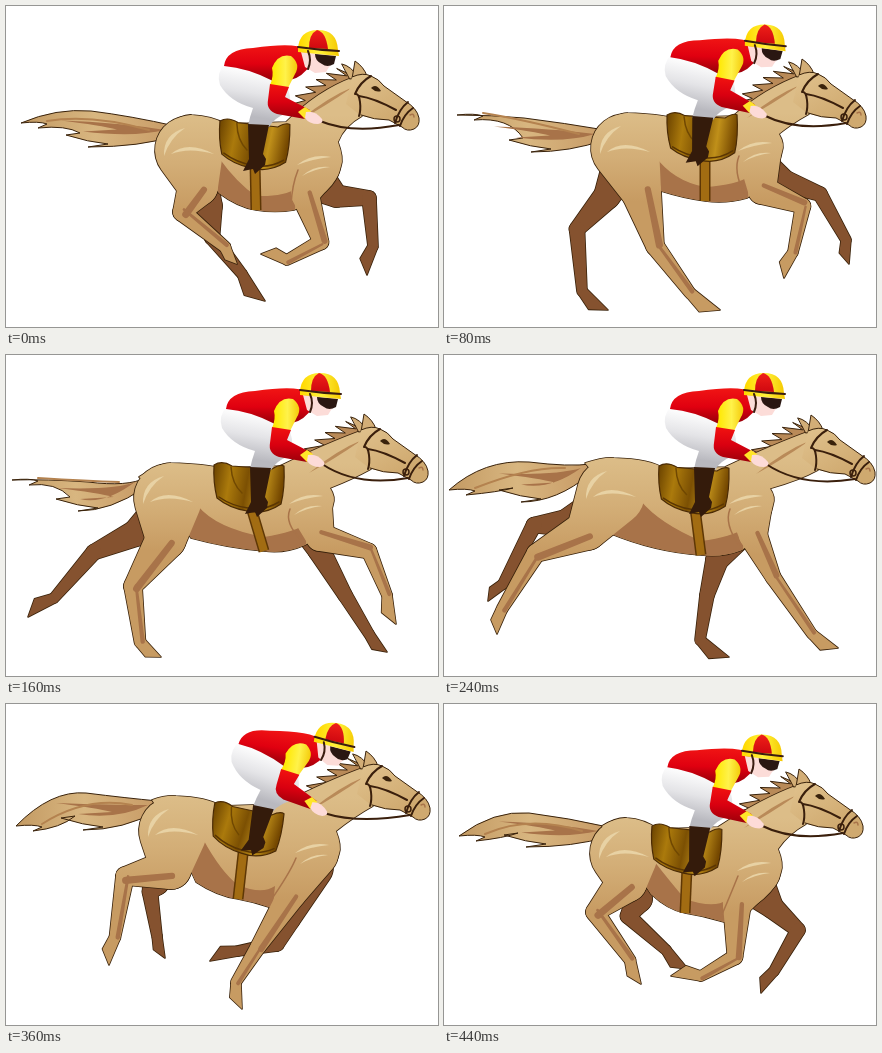
Animation of 432x321 px, one loop 0.48 s. Source, as an HTML page with a canvas:

```html
<!DOCTYPE html>
<html lang="en">
<head>
<meta charset="utf-8">
<title>Galloping horse</title>
<style>
  html, body { margin: 0; width: 100%; height: 100%; overflow: hidden; background: #fff; }
  canvas { display: block; width: 432px; height: 321px; }
</style>
</head>
<body>
<canvas id="stage" width="432" height="321"></canvas>
<script>
const ctx = document.getElementById('stage').getContext('2d');
const STEP = 40, STEPS = 12;
const KEYS = [0, 2, 4, 6, 7, 9, 11];
const INK = '#39220b', TAN = '#d3ae77', LIGHT = '#e8d2a4', SHADE = '#a87349', FAR = '#85522f', STRAP = '#3a1f0c';

// Key poses, one row per entry of KEYS. Legs: upper joint, middle joint, fetlock, toe.
const nearHind = [
  [192,180, 176,206, 219,241, 231,258],
  [197,185, 211,240, 246,287, 276,304],
  [160,184, 127,231, 134,287, 155,302],
  [143,175, 92,198, 58,254, 53,279],
  [150,172, 97,185, 59,233, 44,257],
  [165,165, 119,172, 109,233, 103,261],
  [183,178, 151,208, 186,256, 197,280]];
const farHind = [
  [203,200, 206,231, 236,268, 259,295],
  [163,190, 133,223, 138,285, 164,304],
  [130,178, 88,197, 48,243, 22,262],
  [122,168, 90,170, 59,229, 44,246],
  [128,165, 102,165, 86,228, 79,249],
  [150,178, 144,188, 151,232, 159,254],
  [195,195, 184,212, 222,246, 244,265]];
const nearFore = [
  [299,188, 315,236, 281,254, 255,248],
  [318,184, 359,200, 349,246, 340,272],
  [314,182, 363,196, 381,240, 390,269],
  [309,180, 329,222, 368,279, 394,293],
  [307,180, 310,235, 313,287, 338,303],
  [286,190, 252,243, 230,278, 236,305],
  [293,200, 291,253, 257,272, 227,272]];
const farFore = [
  [330,190, 363,192, 367,240, 361,269],
  [340,175, 376,188, 402,234, 405,258],
  [313,195, 339,240, 363,279, 381,297],
  [273,205, 263,240, 256,285, 285,302],
  [262,208, 237,245, 212,279, 195,303],
  [283,215, 271,240, 232,247, 204,257],
  [328,203, 354,226, 330,267, 317,289]];
// Croup, flank, girth, elbow, chest, poll.
const trunk = [
  [186,109, 213,187, 250,204, 288,204, 335,160, 352,68],
  [184,107, 217,185, 261,195, 303,192, 338,146, 361,66],
  [165,108, 185,183, 258,196, 299,190, 327,150, 361,72],
  [170,103, 165,178, 257,200, 298,195, 329,150, 370,73],
  [170,98, 172,176, 243,199, 295,203, 328,150, 370,72],
  [170,92, 190,178, 232,195, 266,204, 333,150, 363,60],
  [183,114, 207,190, 241,209, 280,218, 337,168, 358,78]];
// Root, tip, upper bend, lower bend.
const tailKeys = [
  [163,119, 15,117, 85,98, 90,141],
  [155,123, 13,109, 80,105, 95,146],
  [133,122, 6,125, 82,120, 80,156],
  [141,108, 5,135, 85,100, 85,147],
  [147,102, 3,130, 85,92, 85,140],
  [146,96, 10,122, 80,82, 85,126],
  [158,122, 15,132, 85,102, 90,143]];
// x, y, tilt in degrees.
const saddleKeys = [[214,114,2], [223,108,-1], [208,109,0], [215,110,1], [208,105,5], [209,98,8], [208,121,2]];
const riderKeys = [[213,70,0], [221,61,2], [215,64,0], [221,64,0], [229,58,4], [226,49,9], [218,73,2]];

// Periodic cubic through the key poses.
function sample(rows, t) {
  const n = KEYS.length;
  let i = n - 1;
  while (KEYS[i] > t) i--;
  const row = k => rows[(k + n) % n];
  const time = k => KEYS[(k + n) % n] + STEPS * Math.floor(k / n);
  const h = time(i + 1) - time(i), u = (t - time(i)) / h;
  return rows[0].map((_, c) => {
    const a = row(i)[c], b = row(i + 1)[c];
    const va = (b - row(i - 1)[c]) / (time(i + 1) - time(i - 1)) * h;
    const vb = (row(i + 2)[c] - a) / (time(i + 2) - time(i)) * h;
    return a + u * (va + u * (3 * (b - a) - 2 * va - vb + u * (2 * (a - b) + va + vb)));
  });
}
const points = (rows, t) => {
  const v = sample(rows, t);
  return v.filter((_, i) => i % 2 === 0).map((x, i) => [x, v[2 * i + 1]]);
};
const add = ([x, y], dx, dy) => [x + dx, y + dy];

function paint(path, fill, line, width = 1) {
  const p = typeof path === 'string' ? new Path2D(path) : path;
  if (fill) { ctx.fillStyle = fill; ctx.fill(p); }
  if (line) { ctx.strokeStyle = line; ctx.lineWidth = width; ctx.stroke(p); }
}
function ramp(x0, y0, x1, y1, ...colors) {
  const g = ctx.createLinearGradient(x0, y0, x1, y1);
  colors.forEach((c, i) => g.addColorStop(i / (colors.length - 1), c));
  return g;
}
function placed([x, y, tilt], ox, oy, draw) {
  ctx.save();
  ctx.translate(x, y);
  ctx.rotate(tilt * Math.PI / 180);
  ctx.translate(-ox, -oy);
  draw();
  ctx.restore();
}

// Tapered link between two round joints.
function link([x0, y0], r0, [x1, y1], r1) {
  const p = new Path2D(), d = Math.hypot(x1 - x0, y1 - y0), a = Math.atan2(y1 - y0, x1 - x0);
  if (d <= Math.abs(r0 - r1)) {
    p.arc(x0, y0, r0, 0, 7);
  } else {
    const o = Math.acos((r0 - r1) / d);
    p.arc(x0, y0, r0, a + o, a - o + 2 * Math.PI);
    p.arc(x1, y1, r1, a - o, a + o);
    p.closePath();
  }
  return p;
}
function hoof([fx, fy], [tx, ty], r) {
  const dx = tx - fx, dy = ty - fy, d = Math.hypot(dx, dy) || 1;
  const nx = -dy / d * r, ny = dx / d * r;
  return new Path2D(`M${fx - nx} ${fy - ny}L${tx} ${ty}L${fx + .5 * dx - .34 * dy} ${fy + .5 * dy + .34 * dx}L${fx + nx} ${fy + ny}Z`);
}
function limb(root, leg, radii) {
  const joints = [root, ...leg.slice(0, 3)];
  const parts = radii.slice(1).map((r, i) => link(joints[i], radii[i], joints[i + 1], r));
  return [...parts, hoof(leg[2], leg[3], radii[3])];
}
const edge = parts => parts.forEach(p => paint(p, INK, INK, 1.6));
const fill = (parts, color) => parts.forEach(p => paint(p, color));

function legShade(leg, radii) {
  for (let i = 0; i < 2; i++) {
    const [a, b] = [leg[i], leg[i + 1]], d = Math.hypot(b[0] - a[0], b[1] - a[1]) || 1;
    const nx = (b[1] - a[1]) / d, ny = (a[0] - b[0]) / d;
    const off = k => k * .5;
    const ra = radii[i + 1] * .7, rb = radii[i + 2];
    paint(link(add(a, nx * off(ra), ny * off(ra)), ra * .22, add(b, nx * off(rb), ny * off(rb)), rb * .4), SHADE);
  }
}

function drawTail([root, tip, up, low]) {
  const [rx, ry] = root, [tx, ty] = tip, [ux, uy] = up, [lx, ly] = low;
  paint(`M${rx + 6} ${ry + 1}Q${ux + 40} ${uy + 12} ${ux} ${uy + 7}Q${tx + 35} ${uy + 4} ${tx} ${ty}
    Q${tx + 18} ${ty - 2} ${tx + 26} ${ty + 1}L${tx + 17} ${ty + 5}Q${lx - 30} ${ty + 2} ${lx - 16} ${ly - 14}L${lx - 30} ${ly - 12}
    Q${lx - 8} ${ly - 5} ${lx + 12} ${ly - 3}L${lx - 8} ${ly}Q${rx - 28} ${ly} ${rx + 5} ${ry + 11}Z`,
    ramp(tx, 0, rx, 0, '#c39a63', '#d8b680', '#c99d68'), INK);
  const my = (uy + ly) / 2;
  paint(`M${rx - 4} ${ry + 5}Q${ux + 28} ${my - 3} ${ux - 30} ${my - 5}Q${ux + 10} ${my} ${ux + 26} ${my + 4}L${ux - 8} ${my + 6}
    Q${rx - 35} ${my + 12} ${rx - 4} ${ry + 5}Z`, SHADE);
  paint(`M${rx - 20} ${ry + 5}Q${ux} ${my - 12} ${tx + 26} ${ty - 2}`, null, '#b4824f', 2);
}

function drawHead([px, py]) {
  ctx.save();
  ctx.translate(px, py);
  paint('M-16 -10Q-7 -8 0 3L-8 5Z', TAN, INK);
  paint('M-6 5L-3 -13Q6 -7 9 2Z', TAN, INK);
  paint('M-6 3Q5 -2 13 2Q21 5 26 12L47 27Q59 34 61 44Q62 52 56 55Q49 58 44 53Q37 49 31 46Q16 46 2 41L-12 30Z',
    ramp(0, 0, 30, 50, '#dfc08b', '#cfa96f'));
  paint('M-6 3Q5 -2 13 2Q21 5 26 12L47 27Q59 34 61 44Q62 52 56 55Q49 58 44 53Q37 49 31 46Q16 46 3 41', null, INK);
  paint('M13 14Q18 9 23 17Q18 19 13 14Z', INK);
  paint('M52 41Q56 39 56 43', null, SHADE, 1.5);
  paint('M13 2Q2 8 -3 20Q1 19 2 28Q3 36 1 42M1 22Q16 24 38 36M50 28Q41 35 37 49M55 34Q46 40 42 52', null, STRAP, 2);
  paint('M36 45a3 3 0 1 0 6 0a3 3 0 1 0 -6 0', null, STRAP, 1.5);
  ctx.restore();
}

function drawMane([px, py]) {
  const bx = px - 62, by = py + 37;
  let d = `M${px - 4} ${py + 2}`;
  for (let i = 1; i <= 6; i++) {
    const u = i / 6, x = px - 4 + (bx - px) * u, y = py + 2 + (by - py) * u * u * .65 + (by - py) * u * .35;
    d += `L${x - 7} ${y - 11 + 4 * u}L${x + 3} ${y - 3}`;
  }
  paint(d + `L${bx + 3} ${by + 4}Q${px - 28} ${py + 14} ${px} ${py + 14}Z`, '#b98a58', INK);
}

function drawSaddle() {
  paint('M0 1Q8 -4 18 2L58 5Q66 0 70 2Q71 24 67 40Q51 51 33 47Q15 44 3 34Q-1 18 0 1Z',
    ramp(0, 0, 70, 12, '#6b4300', '#ab7a0c', '#7c5003', '#c0901a', '#744700'), '#4b2b05', 1.2);
  paint('M5 33Q18 42 34 44Q50 47 65 38', null, '#5b3603', 1.5);
  paint('M17 3Q18 20 28 29', null, '#704802', 1.5);
}

function drawRider() {
  paint('M219 57Q210 67 214 79Q224 96 247 102Q244 110 242 120L263 121Q268 112 281 107Q287 98 282 82L266 66Z',
    ramp(240, 62, 232, 108, '#ffffff', '#e4e4e7', '#b9b9bf'));
  paint('M242 118L263 119L257 148L260 153L259 159L249 168L247 163L237 165L243 153Z', '#341b0b');
  paint('M218 60Q220 43 247 42Q288 36 300 43L305 58Q296 72 284 74L267 75Q242 62 218 60Z',
    ramp(0, 40, 0, 76, '#f01414', '#e00010', '#8e0008'));
  paint('M266 62Q272 47 285 50Q295 58 289 68L282 82L264 79Q268 70 266 62Z', ramp(266, 0, 293, 0, '#ffe800', '#fff24a', '#f2c400'));
  paint('M264 78L283 81L279 91L304 104L299 113L271 108Q260 104 262 94Z', ramp(0, 80, 0, 112, '#ef1010', '#d90010', '#a0000a'));
  paint('M292 106L299 101L305 105L299 113Z', '#ffe528');
  paint('M300 106Q309 104 316 113Q318 117 312 118Q303 118 299 112Z', '#fddbd8');
  paint('M295 46L328 48L327 57Q322 61 320 66L309 67L299 61Z', '#fcdcd8');
  paint('M309 48L330 50L328 58Q321 62 316 58Q309 55 309 48Z', '#2a1712');
  paint('M292 43Q293 24 312 24Q331 24 332 44L333 50L322 49L292 46Z', ramp(293, 0, 333, 0, '#ffd800', '#fff23a', '#f5c800'));
  paint('M303 42Q303 28 311 24Q320 26 322 43Z', ramp(0, 24, 0, 43, '#f02018', '#cf0810'));
  paint('M292 41Q312 44 333 45M302 45Q306 54 302 63', null, '#3a1c10', 2);
}

function draw(t) {
  ctx.clearRect(0, 0, 432, 321);
  ctx.fillStyle = '#fff';
  ctx.fillRect(0, 0, 432, 321);
  ctx.lineJoin = ctx.lineCap = 'round';

  const [croup, flank, girth, elbow, chest, poll] = points(trunk, t);
  const tail = points(tailKeys, t), saddle = sample(saddleKeys, t), rider = sample(riderKeys, t);
  const hip = add(croup, -3, 35), shoulder = add(chest, -23, 0);
  const hindR = [34, 20, 9, 5.5], foreR = [22, 14, 7.5, 5];
  const hindLeg = points(nearHind, t), foreLeg = points(nearFore, t);
  const hind = limb(hip, hindLeg, hindR), fore = limb(shoulder, foreLeg, foreR);

  for (const parts of [
    limb(add(hip, 2, 8), points(farHind, t), [22, 13, 7.5, 5]),
    limb(add(chest, -26, 14), points(farFore, t), [20, 11, 7, 5])
  ]) { edge(parts); fill(parts, FAR); }

  drawTail(tail);
  drawMane(poll);

  const [px, py] = poll, [sx, sy] = saddle;
  const body = new Path2D(`M${tail[0]}Q${croup[0] - 10} ${croup[1] - 1} ${croup}Q${sx - 8} ${croup[1] + 1} ${sx + 6} ${sy + 4}
    L${sx + 66} ${sy + 2}Q${px - 40} ${py + 16} ${px - 4} ${py + 3}L${px + 4} ${py + 42}
    Q${px - 14} ${py + 52} ${chest[0] - 3} ${(chest[1] + py) / 2 + 22}Q${chest[0] + 3} ${chest[1] - 8} ${chest}
    Q${chest[0] - 6} ${chest[1] + 28} ${elbow}Q${(elbow[0] + girth[0]) / 2} ${girth[1] + 3} ${girth}
    Q${(flank[0] + girth[0]) / 2} ${girth[1] - 3} ${flank}L${hip}Z`);
  paint(body, INK, INK, 1.6);
  edge(hind);
  edge(fore);
  const coat = ramp(0, croup[1], 0, girth[1], '#dcbd88', TAN, '#c79b62');
  paint(body, coat);

  ctx.save();
  ctx.clip(body);
  paint(`M${hip[0] + 30} ${hip[1] + 8}Q${hip[0] + 48} ${flank[1] - 10} ${girth[0]} ${girth[1] - 14}
    Q${elbow[0] - 10} ${elbow[1] - 13} ${elbow[0] + 3} ${elbow[1] - 22}L${elbow[0]} ${elbow[1] + 9}L${girth[0]} ${girth[1] + 9}L${flank[0] - 12} ${flank[1] + 9}Z`, SHADE);
  paint(`M${px - 5} ${py + 13}Q${px - 30} ${py + 23} ${px - 58} ${py + 46}Q${px - 34} ${py + 33} ${px - 5} ${py + 13}Z`, '#b98a58');
  ctx.restore();

  fill(hind, coat);
  fill(fore, coat);
  legShade(hindLeg, hindR);
  legShade(foreLeg, foreR);

  const [hx, hy] = hip, [cx, cy] = shoulder;
  paint(`M${hx - 18} ${hy + 4}Q${hx - 2} ${hy - 10} ${hx + 25} ${hy + 4}Q${hx} ${hy - 3} ${hx - 18} ${hy + 4}Z
    M${hx - 25} ${hy + 6}Q${hx - 26} ${hy - 16} ${hx - 4} ${hy - 22}Q${hx - 19} ${hy - 12} ${hx - 25} ${hy + 6}Z
    M${cx - 21} ${cy - 1}Q${cx - 6} ${cy - 13} ${cx + 13} ${cy - 9}Q${cx - 6} ${cy - 7} ${cx - 21} ${cy - 1}Z
    M${cx - 16} ${cy + 10}Q${cx - 4} ${cy - 1} ${cx + 12} ${cy + 1}Q${cx - 4} ${cy + 3} ${cx - 16} ${cy + 10}Z`, LIGHT);
  paint(`M${cx - 20} ${cy + 4}Q${cx - 26} ${cy + 19} ${elbow[0] - 3} ${elbow[1] - 5}`, null, SHADE, 1.5);

  drawHead(poll);
  ctx.lineCap = 'butt';
  paint(`M${sx + 37 - saddle[2]} ${sy + 43}L${girth}`, null, '#5e3705', 11);
  paint(`M${sx + 37 - saddle[2]} ${sy + 43}L${girth}`, null, '#a26c12', 8);
  ctx.lineCap = 'round';
  placed(saddle, 0, 0, drawSaddle);

  const a = rider[2] * Math.PI / 180, c = Math.cos(a), s = Math.sin(a);
  const hand = [rider[0] + 101 * c - 45 * s, rider[1] + 101 * s + 45 * c];
  paint(`M${hand}Q${(hand[0] + px) / 2 + 12} ${py + 60} ${px + 41} ${py + 51}`, null, STRAP, 2);
  placed(rider, 213, 70, drawRider);
}

let shown = -1;
function tick() {
  const step = Math.floor(performance.now() / STEP) % STEPS;
  if (step !== shown) draw(shown = step);
  requestAnimationFrame(tick);
}
tick();
</script>
</body>
</html>
```
